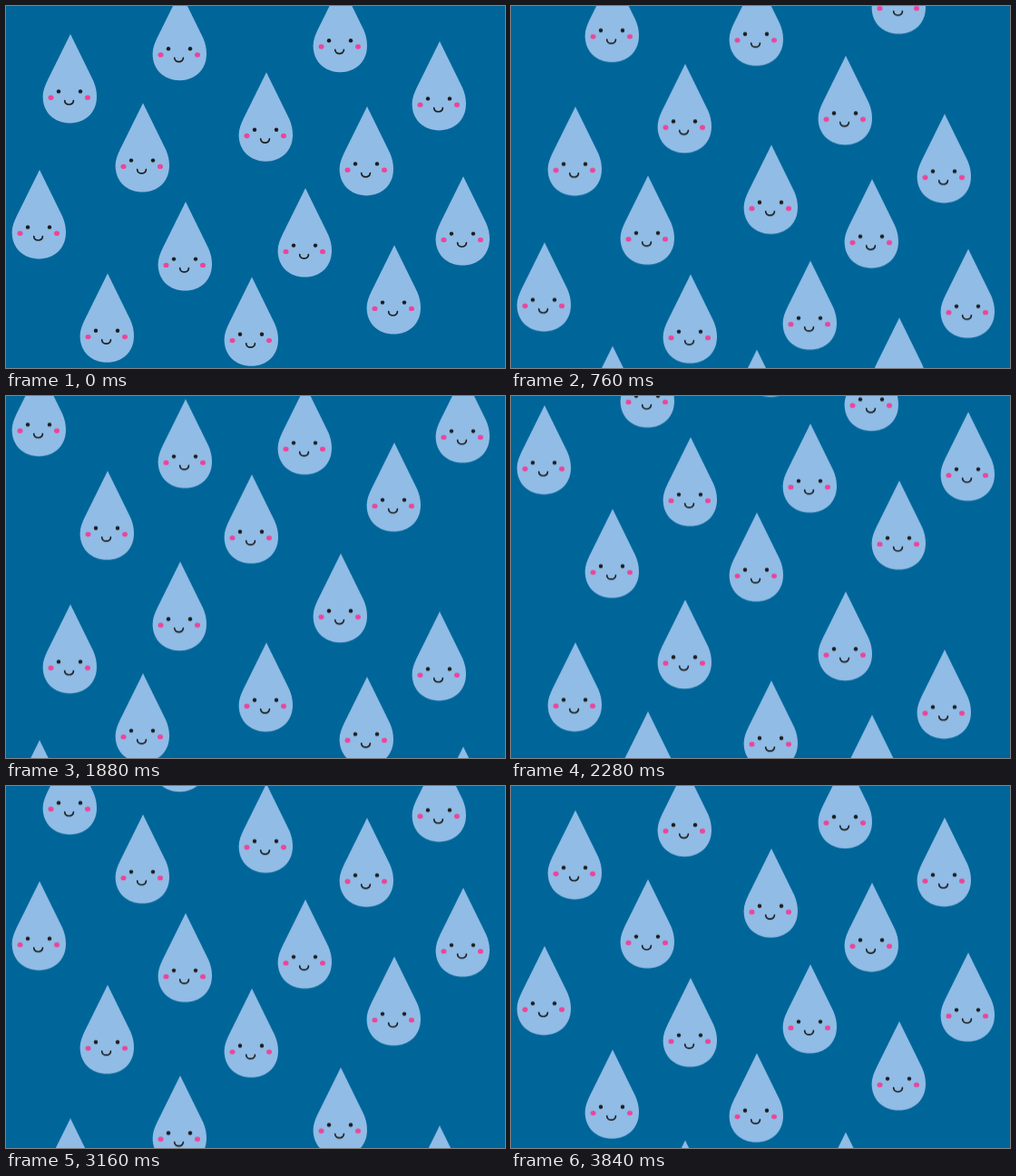
An HTML page without scripts that plays this animation: 550x400 px, repeating every 3880 ms.

```html
<!DOCTYPE html>
<html lang="en">
<head>
<meta charset="utf-8">
<title>Smiling raindrops</title>
<style>
  html, body { margin: 0; width: 100%; height: 100%; overflow: hidden; background: #069; }
  svg { display: block; width: 550px; height: 400px; }

  .rain { animation: fall 3880ms -10ms infinite; }

  /* One 40 ms step per picture; the field repeats every 412px. */
  @keyframes fall {
    0%       { transform: translateY(0);       animation-timing-function: steps(19); }
    19.5876% { transform: translateY(80.2px);  animation-timing-function: steps(15); }
    35.0515% { transform: translateY(144.7px); animation-timing-function: steps(13); }
    48.4536% { transform: translateY(199.2px); animation-timing-function: steps(20); }
    69.0722% { transform: translateY(283.4px); animation-timing-function: steps(12); }
    81.4433% { transform: translateY(336.2px); animation-timing-function: steps(17); }
    98.9691% { transform: translateY(407.8px); animation-timing-function: steps(1); }
    100%     { transform: translateY(412px); }
  }
</style>
</head>
<body>
<svg viewBox="0 0 550 400" role="img" aria-label="Smiling raindrops falling">
  <defs>
    <!-- The origin of a drop is its tip. -->
    <g id="drop">
      <path fill="#90bce6" d="M0 0L25.2 51.5C27.6 57 29 63 29 69C29 87 16 98.4 -.7 98.4S-30.4 87 -30.4 69C-30.4 63 -28 57 -25.4 51.5Z"/>
      <g fill="#1d1d1b">
        <circle cx="-13" cy="63.4" r="2.2"/>
        <circle cx="11" cy="63.4" r="2.2"/>
      </g>
      <g fill="#ee4498">
        <ellipse cx="-21.5" cy="70.2" rx="3" ry="2.7"/>
        <ellipse cx="19" cy="70.2" rx="3" ry="2.7"/>
      </g>
      <path fill="none" stroke="#1d1d1b" stroke-width="1.7" stroke-linecap="round" d="M-6.3 73.5C-6.3 79.2 3.4 79.2 3.4 73.5"/>
    </g>
    <g id="field">
      <use href="#drop" x="369" y="-25.2"/>
      <use href="#drop" x="192" y="-16.2"/>
      <use href="#drop" x="71" y="31"/>
      <use href="#drop" x="478" y="39"/>
      <use href="#drop" x="287" y="73.3"/>
      <use href="#drop" x="151" y="107.2"/>
      <use href="#drop" x="398" y="111"/>
      <use href="#drop" x="37" y="181"/>
      <use href="#drop" x="504" y="188.2"/>
      <use href="#drop" x="330" y="201.2"/>
      <use href="#drop" x="198" y="216.2"/>
      <use href="#drop" x="428" y="264.2"/>
      <use href="#drop" x="112" y="295.4"/>
      <use href="#drop" x="271" y="299.4"/>
    </g>
  </defs>
  <rect width="550" height="400" fill="#069"/>
  <g class="rain">
    <use href="#field"/>
    <use href="#field" y="-412"/>
  </g>
</svg>
</body>
</html>
```
